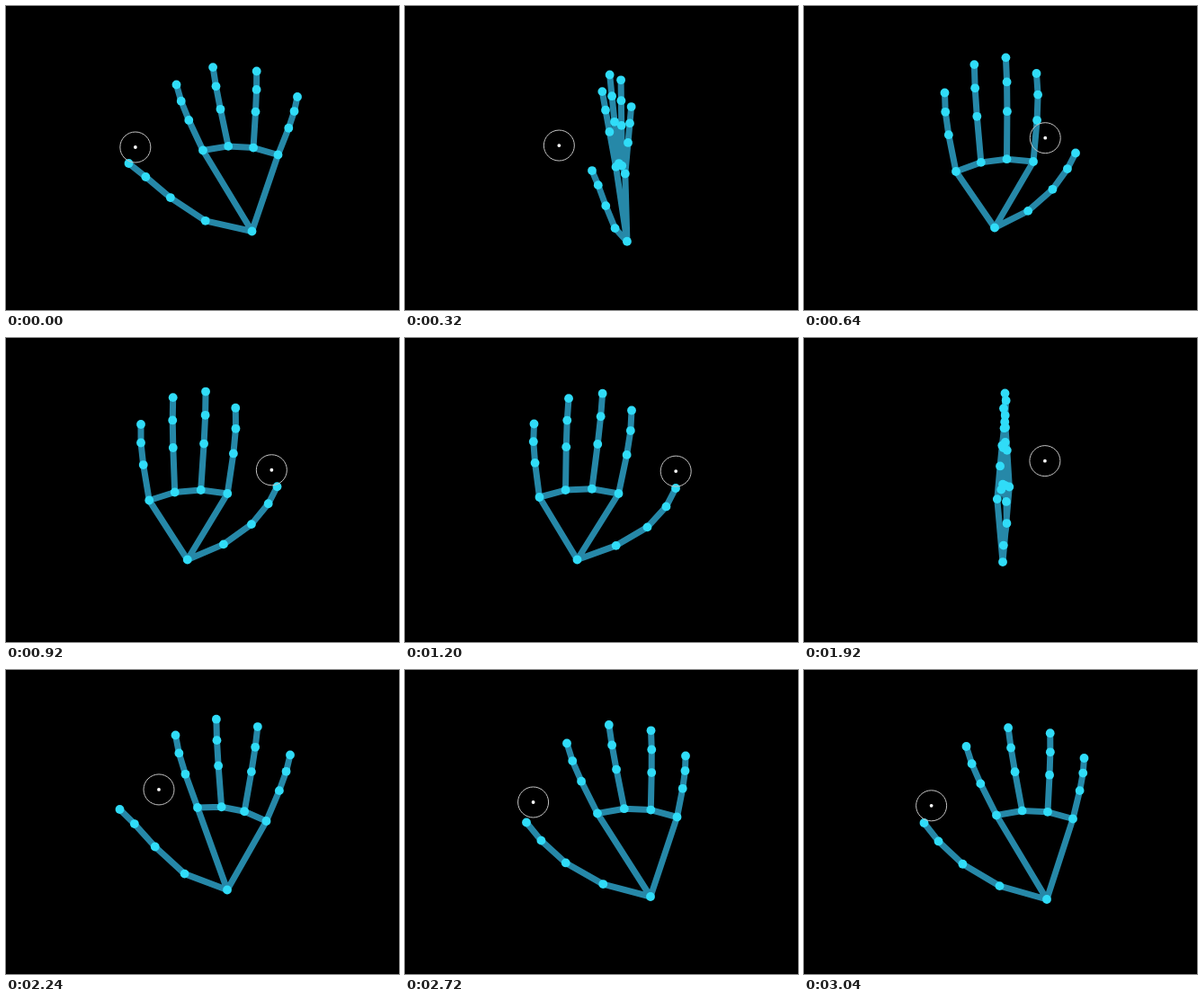
Animation, 437 px wide and 338 px high, one loop 3.08 s. Source, as an HTML page with a canvas:

```html
<!DOCTYPE html>
<html lang="en">
<head>
<meta charset="utf-8">
<title>Hand tracking</title>
<style>
html, body { margin: 0; width: 100%; height: 100%; overflow: hidden; background: #000; }
canvas { display: block; }
</style>
</head>
<body>
<canvas id="stage" width="437" height="338"></canvas>
<script>
const ctx = document.getElementById('stage').getContext('2d');
const LOOP = 3080, STEP = 40, LAG = 190;

const mix = (a, b, k) => a + (b - a) * k;

// The point a fraction k of the way from p to q, pushed sideways by a share of that distance.
function along([px, py], [qx, qy], k, push) {
  const dx = qx - px, dy = qy - py;
  return [px + k * dx - push * dy, py + k * dy + push * dx];
}

function polar([px, py], [qx, qy]) {
  return [Math.atan2(qx - px, py - qy), Math.hypot(qx - px, qy - py)];
}

// Derives all 21 joints from the outer fingers (knuckle and tip), the wrist and the thumb tip.
// curl bends the thumb's end; lean tilts the two inner fingers, in degrees.
function pose(time, { wrist, thumb, curl, index, pinky, lean }) {
  const side = Math.sign(index[0][0] - pinky[0][0]);
  const joints = [wrist];

  for (const k of [.326, .623, .848, 1]) {
    const bow = .107 + curl * (k - .33);
    joints.push(along(wrist, thumb, k, side * 4 * k * (1 - k) * bow));
  }

  const [angleA, lengthA] = polar(...index), [angleB, lengthB] = polar(...pinky);
  for (let i = 0; i < 4; i++) {
    const inner = i % 3 > 0;
    const base = along(index[0], pinky[0], i / 3, inner ? side * .075 : 0);
    const angle = mix(angleA, angleB, i / 3) + (inner ? lean * Math.PI / 180 : 0);
    const length = mix(lengthA, lengthB, i / 3) * (inner ? 1.19 : 1);
    const tip = [base[0] + length * Math.sin(angle), base[1] - length * Math.cos(angle)];
    const bow = side * (.025 - .017 * i);
    joints.push(base, along(base, tip, .47, bow), along(base, tip, .76, bow), tip);
  }
  return { time, side, joints };
}

const poses = [
  pose(0, { wrist: [273.5, 250.5], thumb: [136.5, 175], curl: -.11, lean: -2.5,
    index: [[219, 160.5], [189.5, 87.5]], pinky: [[302.5, 165.5], [324, 101]] }),
  pose(640, { wrist: [212, 246.5], thumb: [302, 163.5], curl: 0, lean: .8,
    index: [[255, 173], [258.5, 75]], pinky: [[169, 184], [156.5, 96.5]] }),
  pose(1200, { wrist: [191.5, 246.5], thumb: [301, 167], curl: .08, lean: 1.8,
    index: [[237.5, 173], [252, 80.5]], pinky: [[149.5, 177], [143.5, 95.5]] }),
  pose(1600, { wrist: [202, 245.5], thumb: [293, 161.5], curl: .16, lean: .5,
    index: [[240, 168], [247.5, 75.5]], pinky: [[158, 180.5], [151.5, 97.5]] }),
  pose(2240, { wrist: [246, 244.5], thumb: [126.5, 155], curl: -.13, lean: 1.3,
    index: [[213, 153], [188.5, 72.5]], pinky: [[289.5, 168], [316, 94.5]] }),
  pose(2720, { wrist: [273, 252], thumb: [135, 169.5], curl: 0, lean: 2.7,
    index: [[214, 159.5], [180, 81.5]], pinky: [[302.5, 163.5], [312, 95.5]] }),
  pose(3040, { wrist: [270, 255], thumb: [133.5, 170], curl: 0, lean: 2.7,
    index: [[214, 161.5], [180.5, 85]], pinky: [[299, 165.5], [311.5, 98]] }),
];

// Turning the hand over starts and ends softly, with a short rest around it.
function turn(k) {
  const u = Math.max(0, Math.min(1, (k - .15) / .77));
  return u * u * (3 - 2 * u);
}

function handAt(t) {
  const next = Math.max(1, poses.findIndex(p => p.time >= t));
  const from = poses[next - 1], to = poses[next];
  const k = (t - from.time) / (to.time - from.time);
  const flip = to.side - from.side;
  const ease = flip ? turn(k) : k;
  const sink = flip ? (flip > 0 ? 13 : 4) * Math.sin(Math.PI * k) : 0;
  return from.joints.map(([x, y], i) =>
    [mix(x, to.joints[i][0], ease), mix(y, to.joints[i][1], ease) + sink]);
}

// The pointer hovers above the thumb tip and follows it with exponential smoothing.
function pointerAt(t) {
  const keep = Math.exp(-STEP / LAG);
  let [x, y] = handAt(0)[4];
  for (let s = STEP; s <= t; s += STEP) {
    const [tipX, tipY] = handAt(s)[4];
    x = mix(tipX, x, keep);
    y = mix(tipY, y, keep);
  }
  const gap = Math.abs(handAt(t)[4][0] - x);
  return [12 + .966 * x, y - 18 - .2 * gap];
}

function dot([x, y], r) {
  ctx.beginPath();
  ctx.arc(x, y, r, 0, 2 * Math.PI);
}

const LINKS = [[0, 1, 2, 3, 4], [0, 5, 9, 13, 17, 0]];
for (let base = 5; base < 21; base += 4) LINKS.push([base, base + 1, base + 2, base + 3]);

function draw(t) {
  ctx.fillStyle = '#000';
  ctx.fillRect(0, 0, 437, 338);

  const joints = handAt(t);
  ctx.strokeStyle = '#2688a8';
  ctx.lineWidth = 7;
  ctx.lineJoin = 'round';
  ctx.beginPath();
  for (const chain of LINKS)
    chain.forEach((j, i) => ctx[i ? 'lineTo' : 'moveTo'](...joints[j]));
  ctx.stroke();

  ctx.fillStyle = '#30dcf8';
  for (const joint of joints) {
    dot(joint, 4.9);
    ctx.fill();
  }

  const pointer = pointerAt(t);
  ctx.strokeStyle = '#c4c4c4';
  ctx.lineWidth = 1;
  dot(pointer, 17);
  ctx.stroke();
  ctx.fillStyle = '#fff';
  dot(pointer, 1.9);
  ctx.fill();
}

const start = performance.now();
function tick() {
  const t = (performance.now() - start) % LOOP;
  draw(Math.floor(t / STEP) * STEP);
  requestAnimationFrame(tick);
}
tick();
</script>
</body>
</html>
```
